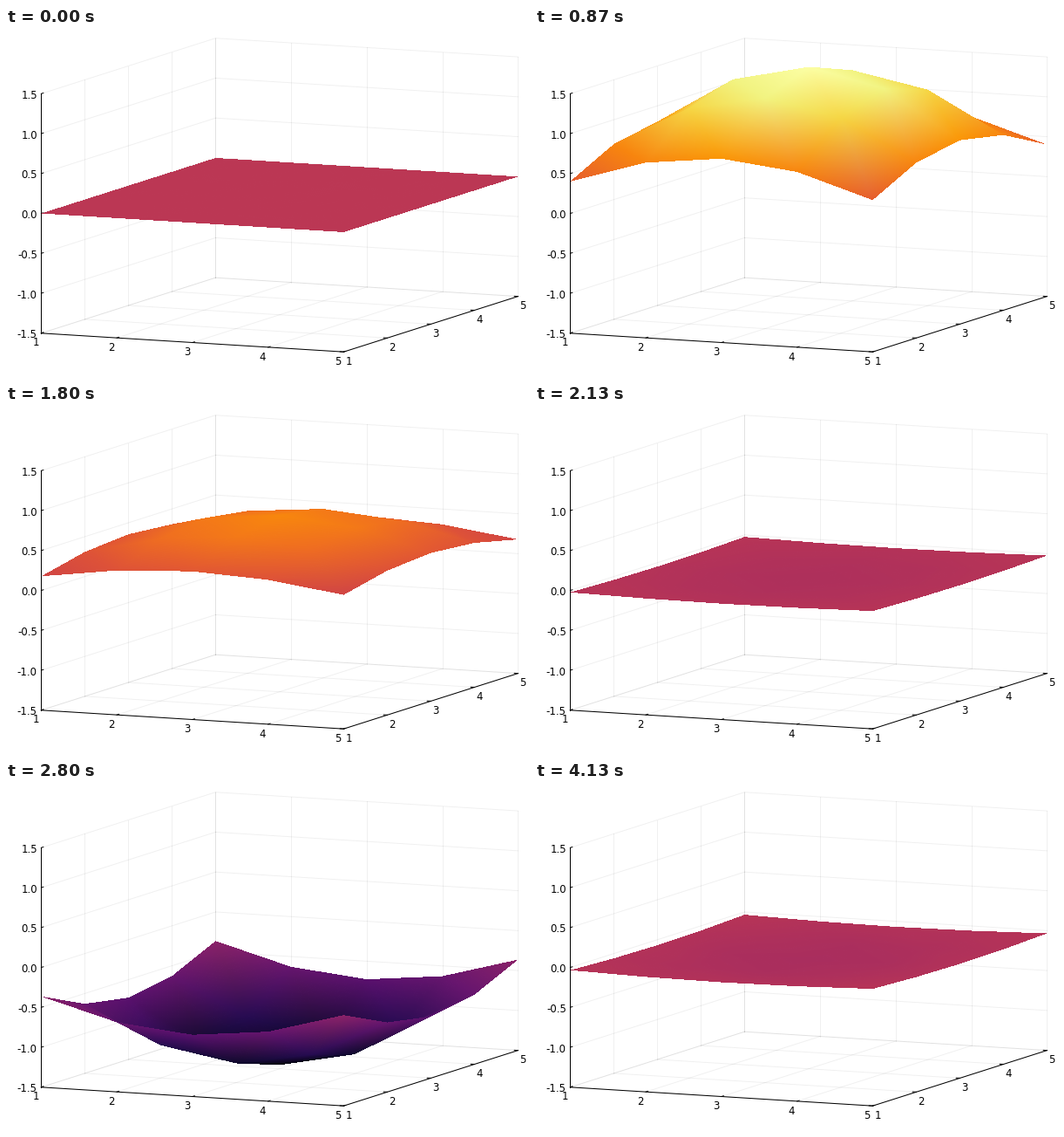
Recreate the animation shown at these times as a matplotlib script. Size 600 px wide and 400 px high, loop 4190 ms.

```python
import numpy as np
import matplotlib.pyplot as plt
from matplotlib.animation import FuncAnimation

W, H, DPI = 600, 400, 100
FRAMES, LOOP_MS = 63, 4190
PX = 72 / DPI
TICKS = range(1, 6)
ZTICKS = np.arange(-1.5, 1.6, 0.5)
CMAP = plt.get_cmap("inferno")

plt.rcParams["font.family"] = "DejaVu Sans"


def project(x, y, z):
    """Orthographic view: data coordinates to stage pixels, y down."""
    u, v, w = x - 1, y - 1, z + 1.5
    return 40.4 + 86.75 * u + 50 * v, 349.8 + 5.35 * u - 15.9 * v - 91.5 * w


fig = plt.figure(figsize=(W / DPI, H / DPI), dpi=DPI, facecolor="white")
ax = fig.add_axes([0, 0, 1, 1])
ax.axis("off")


def segment(a, b, **style):
    (xa, ya), (xb, yb) = project(*a), project(*b)
    ax.plot([xa, xb], [ya, yb], color="black", **style)


def grid(a, b):
    segment(a, b, lw=PX, alpha=0.058, zorder=1)


def axis(a, b):
    segment(a, b, lw=PX, zorder=2, solid_capstyle="projecting")


def label(point, text, dx, dy, ha="center"):
    x, y = project(*point)
    ax.text(x + dx, y + dy, text, size=8.5, ha=ha, va="center_baseline", zorder=4)


def draw_box():
    lo, hi, tick = -1.5, 1.5, 0.048
    for k in TICKS:
        grid((k, 1, lo), (k, 5, lo))
        grid((k, 5, lo), (k, 5, hi))
        grid((1, k, lo), (5, k, lo))
        grid((1, k, lo), (1, k, hi))
        axis((k, 1, lo), (k, 1 + tick, lo))
        axis((5, k, lo), (5 - tick, k, lo))
        label((k, 1, lo), str(k), -6.2, 9.7)
        label((5, k, lo), str(k), 5.9, 9.7)
    for z in ZTICKS:
        grid((1, 1, z), (1, 5, z))
        grid((1, 5, z), (5, 5, z))
        axis((1, 1, z), (1, 1 + tick, z))
        label((1, 1, z), f"{z:.1f}", -4.6, 0.5, ha="right")
    axis((1, 1, lo), (1, 1, hi))
    axis((1, 1, lo), (5, 1, lo))
    axis((5, 1, lo), (5, 5, lo))


# Fundamental mode of a 5 x 5 membrane, indexed [x, y]
X, Y = np.meshgrid(TICKS, TICKS, indexing="ij")
MODE = 5 / 3 * np.sin(np.pi * X / 6) * np.sin(np.pi * Y / 6)

# Two triangles per cell, ordered back to front
TRIANGLES = []
for i in range(4):
    for j in reversed(range(4)):
        edge = [(i + 1, j), (i, j + 1)]
        TRIANGLES += [edge + [(i + 1, j + 1)], edge + [(i, j)]]


def fill_triangle(img, corners, colors):
    """Fill a triangle with hard edges and blended corner colours."""
    x0, y0 = np.maximum(np.floor(corners.min(axis=0)).astype(int), 0)
    x1, y1 = np.ceil(corners.max(axis=0)).astype(int) + 1
    py, px = np.mgrid[y0:min(y1, H), x0:min(x1, W)] + 0.5
    (ax_, ay), (bx, by), (cx, cy) = corners
    det = (by - cy) * (ax_ - cx) + (cx - bx) * (ay - cy)
    if abs(det) < 1e-9:
        return
    a = ((by - cy) * (px - cx) + (cx - bx) * (py - cy)) / det
    b = ((cy - ay) * (px - cx) + (ax_ - cx) * (py - cy)) / det
    weights = np.stack([a, b, 1 - a - b], axis=-1)
    inside = (weights >= -1e-6).all(axis=-1)
    view = img[y0:y1, x0:x1]
    view[inside] = np.clip(weights[inside] @ colors, 0, 1)


def render(z):
    img = np.zeros((H, W, 4))
    points = np.stack(project(X, Y, z), axis=-1)
    colors = CMAP((z + 1.5) / 3)
    for tri in TRIANGLES:
        rows, cols = zip(*tri)
        fill_triangle(img, points[rows, cols], colors[rows, cols])
    return img


draw_box()
surface = ax.imshow(render(0 * MODE), extent=(0, W, H, 0), aspect="auto",
                    interpolation="nearest", zorder=3)
ax.set(xlim=(0, W), ylim=(H, 0))


def update(frame):
    surface.set_data(render(MODE * np.sin(0.1 * frame)))
    return [surface]


anim = FuncAnimation(fig, update, frames=FRAMES, interval=LOOP_MS / FRAMES,
                     repeat=True)
plt.show()
```
